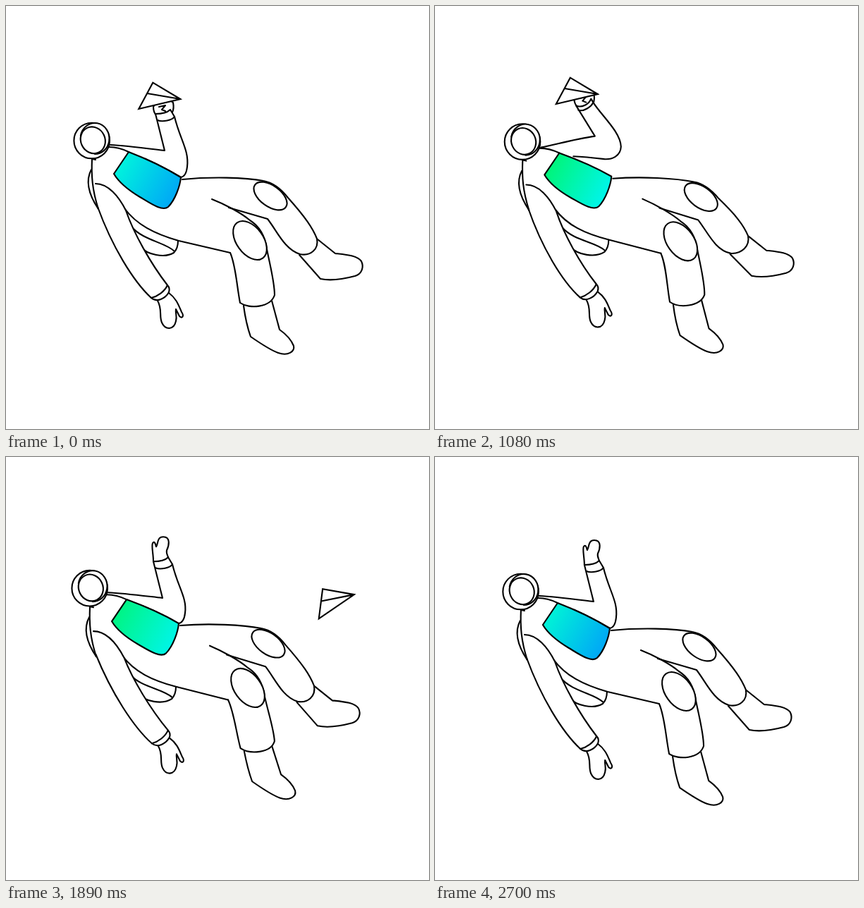
These frames come from a looping animation (600 px wide and 600 px high, 2.73 s). An HTML page with a canvas:

```html
<!DOCTYPE html>
<html lang="en">
<head>
<meta charset="utf-8">
<title>Floating astronaut</title>
<style>
  html, body { margin: 0; width: 100%; height: 100%; overflow: hidden; background: #fff; }
  canvas { display: block; width: 600px; height: 600px; }
</style>
</head>
<body>
<canvas id="stage" width="600" height="600"></canvas>
<script>
const ctx = document.getElementById('stage').getContext('2d');
const LOOP = 2730, THROW = 1080, RELEASE = 1260, GONE = 2175;
const RAD = Math.PI / 180;

const step = (v, a, b) => {
  const t = Math.min(1, Math.max(0, (v - a) / (b - a)));
  return t * t * (3 - 2 * t);
};
const lerp = (a, b, u) => a + (b - a) * u;

// Raised arm, holding still and bent back to throw.
const ARM_REST = 'M148 197 C170 198 200 202 225 205 L212 153 C220 153 229 151 233 147 L239 157 C247 190 260 205 257 228 C256 238 253 242 248 243 C231.9 233.2 214.8 224.4 197.1 216.5';
const ARM_BACK = 'M148 199 C172 194 197 187 224.5 183 L198 140 C206 143 216 138 219 130 L222 135 C233 153 261 177 261.5 198 C261 213 248 218 238 217 C224 215 209 213 194 212';
const CUFF_REST = 'M215 162 C222 165 236 162 239 157';
const CUFF_BACK = 'M201 146 C208 149 220 141 222 135';
const FIST = 'M209 143 C209 155 217 160 225 159 C236 157 239 147 237 137 C230 130 213 133 209 143';
const FINGERS = 'M217 143 L226 141 L221 147 L226 149';
const OPEN_HAND = 'M212 153 C212 142 209 131 211 127 C214 123 215 129 216 132 C219 128 217 118 226 118 C237 118 234 131 231 137 C230 141 232 144 233 147';

const warp = (d, f) => d.replace(/(-?[\d.]+) (-?[\d.]+)/g, (_, x, y) => f(+x, +y).join(' '));

function mix(a, b, u) {
  const nums = b.match(/-?[\d.]+/g);
  let i = 0;
  return a.replace(/-?[\d.]+/g, n => lerp(+n, +nums[i++], u));
}

function draw(d, f, fill) {
  const path = new Path2D(warp(d, f));
  if (fill) { ctx.fillStyle = fill; ctx.fill(path); }
  ctx.stroke(path);
}

function oval([x, y], rx, ry, tilt = 0, fill = '#fff', from = 0, to = 360) {
  ctx.beginPath();
  ctx.ellipse(x, y, rx, ry, tilt * RAD, from * RAD, to * RAD);
  ctx.fillStyle = fill;
  ctx.fill();
  ctx.stroke();
}

function drawPlane(x, y, rot) {
  ctx.save();
  ctx.translate(x - 1.2, y);
  ctx.rotate(rot * RAD);
  ctx.lineJoin = 'miter';
  draw('M0 0 L-39 -23.3 L-59 14 Z M0 0 L-47 -8', (a, b) => [a, b], '#fff');
  ctx.restore();
}

function render(t) {
  // Drift made of two harmonics, zero at the start of the loop.
  const a = 2 * Math.PI * t / LOOP;
  const wave = (s, c = 0, s2 = 0, c2 = 0) =>
    s * Math.sin(a) + c * (Math.cos(a) - 1) + s2 * Math.sin(2 * a) + c2 * (Math.cos(2 * a) - 1);

  const driftX = wave(2.7, 0, -0.7);
  const driftY = wave(2.5, 0.5, -1.4, 0.5);
  const belly = wave(0, 1.6);
  const wind = t < THROW ? step(t, 690, THROW) : 1 - step(t, THROW, 1290);
  const lift = t < THROW ? 0 : -7 * Math.sin(Math.PI * step(t, THROW, 1290));
  const follow = Math.exp(-(((t - 1410) / 200) ** 2));

  const body = (x, y) => {
    const w = Math.exp(-(((x - 255) / 60) ** 2)) * step(y, 195, 235);
    return [x + driftX, y + driftY + belly * w];
  };
  const limb = (ax, ay, weight) => (x, y) => {
    const [px, py] = body(x, y), w = weight(x, y);
    return [px + ax * w, py + ay * w];
  };
  const rightLeg = limb(wave(1.2), wave(-2.8, 0.7, 1.5, 2), x => step(x, 390, 447));
  const leftLeg = limb(wave(-4, 0, 0, -0.8), wave(-1, 0.6, 0, 2.2), (x, y) => step(y, 345, 465));
  const leftArm = limb(wave(-4.2), wave(0, 0, 0, 1), (x, y) => step(y, 255, 410));
  const rightArm = (x, y) => {
    const w = Math.min(1, Math.max(0, (215 - y) / 40));
    const r = 4 * follow * w * (1 - wind) * RAD, c = Math.cos(r), s = Math.sin(r);
    const dx = x - 225, dy = y - 205;
    const [px, py] = body(225 + dx * c - dy * s, 205 + dx * s + dy * c);
    const sag = 2.5 * follow * (1 - wind) * step(y, 235, 200) * step(x, 150, 200);
    return [px, py + lift * w + sag];
  };

  ctx.fillStyle = '#fff';
  ctx.fillRect(0, 0, 600, 600);
  ctx.strokeStyle = '#000';
  ctx.lineWidth = 2.1;
  ctx.lineCap = ctx.lineJoin = 'round';

  // backpack and torso
  draw('M121 232 C114 245 115 264 131 288', body);
  draw('M190 341 C200 353 225 358 238 350 C243 345 244 340 244 333', body);
  draw('M178 313 C195 333 226 335 239 348', body);
  draw('M168 287 C185 310 210 323 245 333 L318 350', body);

  // legs
  draw('M250 246 C290 242 340 243 365 248 C382 251 393 263 400 272 C425 300 435 315 441 330 C444 345 432 355 417 352 C395 345 385 320 371 302 L316 286', rightLeg);
  draw('M416 353 L446 387 C460 390 480 387 495 383 C505 380 508 370 504 362 C498 354 485 353 467 351 L442 331', rightLeg);
  draw('M292 274 C310 281 333 293 346 304 C362 314 368 330 370 345 C375 370 381 392 381 410 C375 428 345 430 332 421 C327 395 326 368 318 350', leftLeg);
  draw('M337 425 C339 440 342 455 347 469 C360 478 375 488 386 492 C400 497 410 490 408 482 C404 472 395 464 388 459 L377 418', leftLeg);
  oval(body(375, 269.5), 27, 14.8, 36);
  oval(leftLeg(346, 332.5), 31, 19, 54);

  // lowered arm
  draw('M215 418 C222 430 217 440 221 449 C226 460 238 460 241 447 C243 440 240 435 241 430 L246 440 C250 444 253 440 249 434 C245 425 242 415 231 407', leftArm, '#fff');
  draw('M127 252 C145 252 160 270 170 290 C181 322 205 365 229 396 C232 399 232 403 231 406 C226 415 214 421 206 414 C180 390 150 340 130 285', leftArm, '#fff');
  draw('M206 414 C215 412 225 405 229 396', leftArm);
  draw('M127 218 L122 217 C121 240 122 260 131 288', body);

  // raised arm
  if (t < RELEASE) {
    const grip = (x, y) => rightArm(x - 14 * wind, y - 14 * wind);
    draw(FIST, grip, '#fff');
    draw(FINGERS, grip);
  } else {
    draw(OPEN_HAND, rightArm, '#fff');
  }
  draw(mix(ARM_REST, ARM_BACK, wind), rightArm, '#fff');
  draw(mix(CUFF_REST, CUFF_BACK, wind), rightArm);

  // vest
  const shade = ctx.createLinearGradient(...body(160, 222), ...body(238, 266));
  shade.addColorStop(0, `hsl(${174 + wave(14, 19, 5, -7.5)}, 100%, 48%)`);
  shade.addColorStop(1, `hsl(${198 + wave(6, 19, -4, -6.5)}, 100%, 48%)`);
  draw('M146 200 C158 200 166 203 174 207', body);
  draw('M174 207 C200 217 225 229 248 243 C247 255 240 275 230 285 C222 292 205 280 190 271 C175 262 160 250 153 238 Z', body, shade);

  // helmet
  oval(body(121.7, 191), 25.3, 25.3);
  oval(body(126, 188), 20.5, 22, 0, '#fff', 190, 450);
  oval(body(123.3, 190.3), 17.2, 19.2, -25);

  // plane: held, swung forward, then gliding
  const [hx, hy] = body(248.5 - 19 * wind, 132 - 9 * wind);
  if (t < THROW) {
    drawPlane(hx, hy, 0);
  } else if (t < RELEASE) {
    const p = ((t - THROW) / (RELEASE - THROW)) ** 2;
    drawPlane(lerp(232, 256, p), lerp(125, 130, p) - 8 * Math.sin(Math.PI * p), -2 * p);
  } else if (t < GONE) {
    const p = (t - RELEASE) / 900;
    drawPlane(256 + 341 * p, 130 + 66 * (1 - (1 - Math.min(1, p)) ** 3.6), -2 - 27 * p);
  }
}

const start = performance.now();
function tick() {
  render((performance.now() - start) % LOOP);
  requestAnimationFrame(tick);
}
tick();
</script>
</body>
</html>
```
